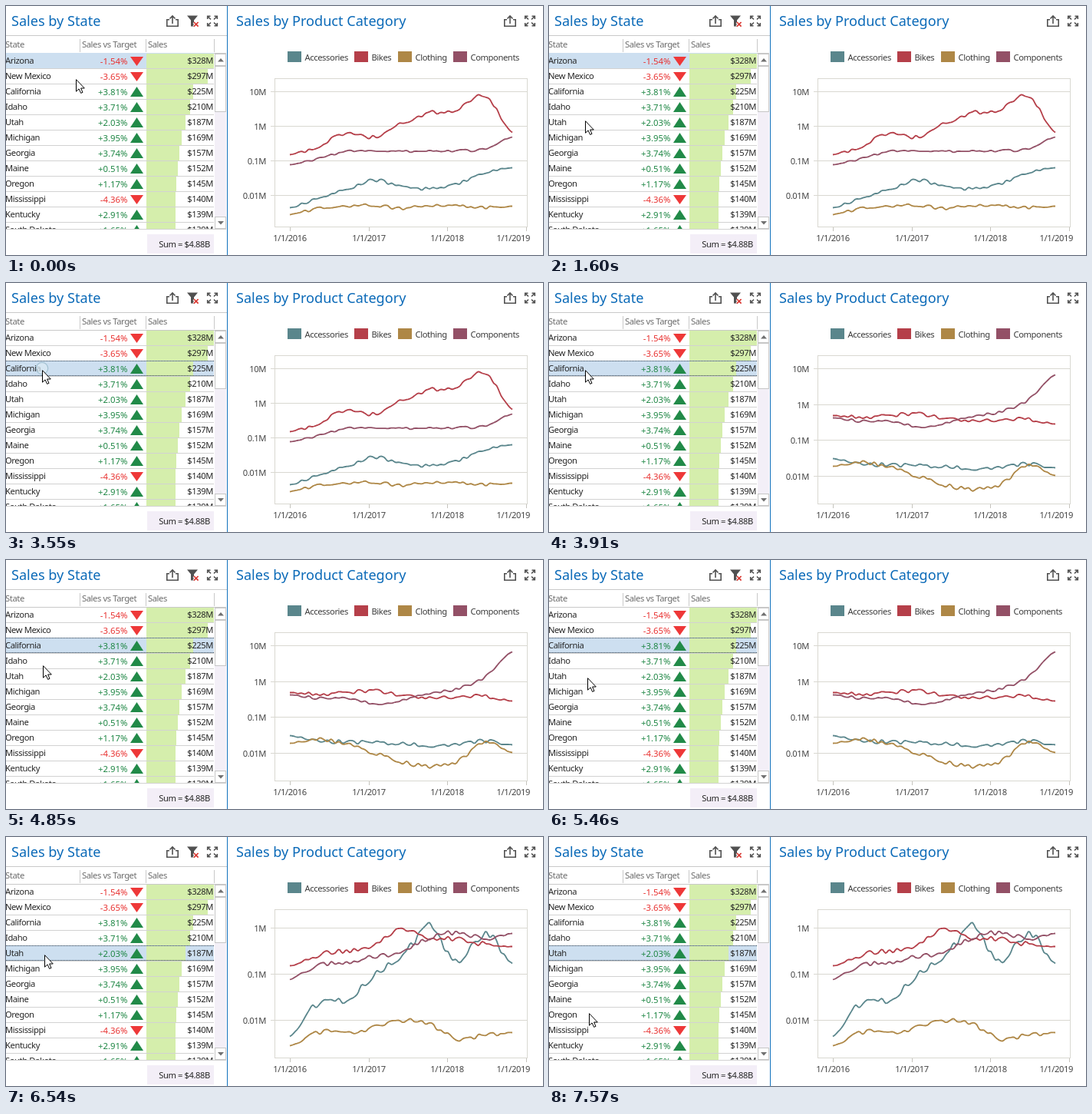
Animation of 700x324 px, one loop 8000 ms. Source, as an HTML page:

```html
<!DOCTYPE html>
<html lang="en">
<head>
<meta charset="utf-8">
<title>Sales dashboard</title>
<style>
  html, body { margin: 0; width: 100%; height: 100%; overflow: hidden; background: #fff; }
  svg { display: block; }
  text { font: 11.2px "Noto Sans", "Open Sans", sans-serif; letter-spacing: -.4px; fill: #262626; }
  .title { font-size: 18.1px; letter-spacing: 0; fill: #0b6ab8; }
  .head { fill: #6c6c6c; }
  .pct { letter-spacing: 0; font-size: 11.4px; }
  .axis { fill: #444; }
  .end { text-anchor: end; }
  .mid { text-anchor: middle; }
  .icon { fill: none; stroke: #505050; stroke-width: 1.6; }
</style>
</head>
<body>
<svg id="stage" width="700" height="324" viewBox="0 0 700 324"></svg>
<script>
const LOOP = 8000, STEP = 30, ROW_TOP = 61, ROW_H = 20;
const GREEN = '#1f8745', RED = '#e8302f';
const stage = document.getElementById('stage');

function add(parent, tag, attrs, content) {
  const el = document.createElementNS('http://www.w3.org/2000/svg', tag);
  for (const key in attrs) el.setAttribute(key, attrs[key]);
  if (content !== undefined) el.textContent = content;
  return parent.appendChild(el);
}
const rect = (p, x, y, width, height, fill) => add(p, 'rect', { x, y, width, height, fill });
const path = (p, d, attrs) => add(p, 'path', { d, ...attrs });
const label = (p, x, y, s, cls = '', fill) =>
  add(p, 'text', { x, y, class: cls, ...(fill && { style: `fill:${fill}` }) }, s);

// ---- Icons
function shareIcon(x) {
  path(stage, `M${x + 4} 17.8H${x + .8}V26.2H${x + 15.2}V17.8H${x + 12}M${x + 8} 23V13.5M${x + 4.5} 16.5L${x + 8} 13L${x + 11.5} 16.5`, { class: 'icon' });
}
function expandIcon(x) {
  const g = add(stage, 'g', { transform: `translate(${x + 7} 19.5)` });
  for (const sx of [1, -1])
    for (const sy of [1, -1])
      path(g, 'M2.5 6.3H6.3V2.5M2 2L6 6', { class: 'icon', transform: `scale(${sx} ${sy})` });
}
function filterIcon(x) {
  const cross = `M${x + 9} 21L${x + 14.6} 26.6M${x + 14.6} 21L${x + 9} 26.6`;
  path(stage, `M${x} 12.5H${x + 14}L${x + 9} 18.5V26.5H${x + 5}V18.5Z`, { fill: '#505050' });
  path(stage, cross, { stroke: '#fff', 'stroke-width': 4 });
  path(stage, cross, { stroke: '#d9362f', 'stroke-width': 1.7 });
}

// ---- Grid panel
const rows = [
  ['Arizona', -1.54, 328], ['New Mexico', -3.65, 297], ['California', 3.81, 225],
  ['Idaho', 3.71, 210], ['Utah', 2.03, 187], ['Michigan', 3.95, 169],
  ['Georgia', 3.74, 157], ['Maine', .51, 152], ['Oregon', 1.17, 145],
  ['Mississippi', -4.36, 140], ['Kentucky', 2.91, 139], ['South Dakota', 1.65, 139]
];
label(stage, 7, 26, 'Sales by State', 'title');
shareIcon(209);
filterIcon(236);
expandIcon(262);
label(stage, -1, 54, 'State', 'head');
label(stage, 99, 54, 'Sales vs Target', 'head');
label(stage, 185, 54, 'Sales', 'head');
path(stage, 'M0 38.5H288M0 61.5H287M96.5 43V60M182.5 43V60M271.5 43V60', { stroke: '#c9c9c9' });

add(add(add(stage, 'defs'), 'clipPath', { id: 'body' }), 'rect', { x: 0, y: 61, width: 271, height: 230 });
const grid = add(stage, 'g', { 'clip-path': 'url(#body)' });
rows.forEach((r, i) => path(grid, `M0 ${ROW_TOP + i * ROW_H + 20.5}H271`, { stroke: '#d2d2d2' }));
const selection = rect(grid, 0, 0, 271, 20, '#cddff0');
rows.forEach(([name, change, sales], i) => {
  const y = ROW_TOP + i * ROW_H, up = change > 0;
  rect(grid, 183, y + 1, Math.ceil(sales * .268), 19, '#d5eeac');
  label(grid, -1, y + 14, name);
  label(grid, 158.5, y + 15, (up ? '+' : '') + change.toFixed(2) + '%', 'pct end', up ? GREEN : RED);
  path(grid, up ? `M162 ${y + 17}H179L170.5 ${y + 4}Z` : `M162 ${y + 5}H179L170.5 ${y + 17}Z`,
    { fill: up ? '#218a48' : '#ee3838' });
  label(grid, 270, y + 14, `$${sales}M`, 'end');
});
const focusBox = path(grid, 'M0 .5H271M0 19.5H271', { stroke: '#28394a', 'stroke-dasharray': '1 1' });

path(stage, 'M0 290.5H287', { stroke: '#d2d2d2' });
rect(stage, 272, 62, 15, 228, '#f3eff7');
for (const [y, h] of [[62.5, 15], [78.5, 59], [274.5, 15]])
  add(stage, 'rect', { x: 272.5, y, width: 14, height: h, fill: '#fff', stroke: '#c6c6c6' });
path(stage, 'M276 72.5H284L280 68ZM276 280H284L280 284.5Z', { fill: '#707070' });
rect(stage, 184, 297, 87, 25, '#f3eef7');
label(stage, 266, 314, 'Sum = $4.88B', 'end');
rect(stage, 288, 0, 1, 324, '#1272bd');

// ---- Chart panel
label(stage, 300, 26, 'Sales by Product Category', 'title');
shareIcon(649);
expandIcon(676);
const legend = [
  ['Accessories', '#5a868c', 367], ['Bikes', '#b53f49', 454],
  ['Clothing', '#ae8746', 511], ['Components', '#935066', 583]
];
for (const [name, color, x] of legend) {
  rect(stage, x, 59, 18, 14, color);
  label(stage, x + 22.5, 70.5, name, '', '#3c3c3c');
}
add(stage, 'rect', { x: 350.5, y: 94.5, width: 329, height: 193, fill: 'none', stroke: '#d9d8d1' });
for (let i = 0; i < 4; i++) {
  const x = 370 + Math.round(i * 102.6), last = i === 3;
  path(stage, `M${x + .5} 288V293`, { stroke: '#c4c3bc' });
  label(stage, last ? 683 : x, 306, `1/1/${2016 + i}`, last ? 'axis end' : 'axis mid');
}

// Each trend has a few evenly spaced heights; seeded noise makes the weekly wiggle.
const SCALE = ['10M', '1M', '0.1M', '0.01M'];
const arizona = {
  scale: SCALE, top: 111, gap: 45,
  trends: [
    { keys: [262, 249, 239, 226, 235, 237, 231, 217, 210], rough: 4 },
    { keys: [193, 182, 166, 170, 153, 139, 135, 116, 164], rough: 5 },
    { keys: [271, 263, 261, 259, 263, 259, 260, 262, 260], rough: 4 },
    { keys: [206, 198, 189, 188, 189, 188, 188, 185, 170], rough: 3 }
  ]
};
const california = {
  scale: SCALE, top: 111, gap: 46.7,
  trends: [
    { keys: [228, 235, 236, 237, 238, 241, 240, 235, 240], rough: 5 },
    { keys: [172, 174, 172, 170, 175, 178, 178, 177, 183], rough: 5 },
    { keys: [238, 233, 239, 250, 262, 268, 262, 237, 250], rough: 5 },
    { keys: [175, 179, 180, 186, 182, 174, 167, 152, 119], rough: 4 }
  ]
};
const utah = {
  scale: SCALE.slice(1), top: 118, gap: 60,
  trends: [
    { keys: [259, 217, 214, 180, 158, 116, 165, 125, 164], rough: 13 },
    { keys: [167, 153, 147, 142, 118, 132, 132, 139, 142], rough: 7 },
    { keys: [271, 254, 254, 248, 238, 243, 262, 258, 254], rough: 6 },
    { keys: [185, 167, 163, 155, 150, 131, 124, 132, 125], rough: 6 }
  ]
};

function random(seed) {
  return () => (seed = (seed * 16807) % 2147483647) / 2147483647;
}
// Smooth curve through evenly spaced values; pos runs from 0 to the last index.
function spline(values, pos) {
  const i = Math.min(Math.floor(pos), values.length - 2), f = pos - i;
  const at = k => values[Math.max(0, Math.min(values.length - 1, k))];
  const [a, b, c, d] = [at(i - 1), at(i), at(i + 1), at(i + 2)];
  return b + f * ((c - a) + f * ((2 * a - 5 * b + 4 * c - d) + f * (3 * (b - c) + d - a))) / 2;
}
function trendPath({ keys, rough }, seed) {
  const rnd = random(seed), WEEKS = 156, points = [];
  const noise = Array.from({ length: 60 }, () => rnd() - .5);
  for (let w = 0; w <= WEEKS; w++) {
    const f = w / WEEKS, settle = Math.min(1, f * 12, (1 - f) * 12);
    const y = spline(keys, f * (keys.length - 1)) + spline(noise, f * 59) * rough * settle;
    points.push(`${(370 + f * 290).toFixed(1)} ${(y + .5).toFixed(1)}`);
  }
  return 'M' + points.join('L');
}
const charts = [arizona, california, utah].map(({ scale, top, gap, trends }, n) => {
  const g = add(stage, 'g');
  scale.forEach((s, i) => {
    const y = Math.round(top + i * gap);
    path(g, `M345 ${y + .5}H680`, { stroke: '#d9d8d1' });
    label(g, 339, y + 4.5, s, 'axis end');
  });
  trends.forEach((trend, i) => path(g, trendPath(trend, 7001 + n * 40321 + i * 9173), {
    fill: 'none', stroke: legend[i][1], 'stroke-width': 1.8, 'stroke-linejoin': 'round'
  }));
  return g;
});

// ---- Pointer
const ripple = add(stage, 'circle', { fill: '#dcebf5', stroke: '#94b7c8', 'stroke-width': 1.2 });
const pointer = add(stage, 'g');
path(pointer, 'M.5 .7V16.2L4.1 12.9L6.6 18.4L9 17.4L6.6 12H11.3Z', { fill: '#fff', stroke: '#000' });

// start, end, x, y
const moves = [
  [460, 461, 92, 95], [1090, 1300, 49, 183], [1300, 1870, 46, 119], [1930, 2220, 47, 113],
  [4510, 5250, 50, 166], [5340, 5460, 50, 153], [6970, 7570, 52, 229]
];
const clicks = [{ at: 3220, row: 2 }, { at: 5820, row: 4 }];
const RIPPLE = 690, REFRESH = 540;

function place(t) {
  let x = 91, y = 95;
  for (const [start, end, toX, toY] of moves) {
    const f = Math.max(0, Math.min(1, (t - start) / (end - start)));
    x += (toX - x) * f;
    y += (toY - y) * f;
  }
  return [Math.round(x), Math.round(y)];
}

function draw(time) {
  const t = Math.floor(time / STEP) * STEP + 10;
  const [x, y] = place(t);
  pointer.setAttribute('transform', `translate(${x} ${y})`);

  const last = clicks.filter(c => t >= c.at).pop();
  const top = ROW_TOP + (last ? last.row : 0) * ROW_H;
  selection.setAttribute('y', top);
  focusBox.setAttribute('transform', `translate(0 ${top})`);
  focusBox.setAttribute('visibility', last ? 'visible' : 'hidden');

  const shown = clicks.filter(c => t >= c.at + REFRESH).length;
  charts.forEach((g, i) => g.setAttribute('display', i === shown ? 'inline' : 'none'));

  const p = last ? Math.min(1, (t - last.at) / RIPPLE) : 1;
  ripple.setAttribute('visibility', p < 1 ? 'visible' : 'hidden');
  ripple.setAttribute('cx', x);
  ripple.setAttribute('cy', y - 2);
  ripple.setAttribute('r', 1 + p * 14);
  ripple.setAttribute('opacity', Math.min(.9, 1.4 * (1 - p)));
}

const start = performance.now();
function tick() {
  draw((performance.now() - start) % LOOP);
  requestAnimationFrame(tick);
}
draw(0);
requestAnimationFrame(tick);
</script>
</body>
</html>
```
